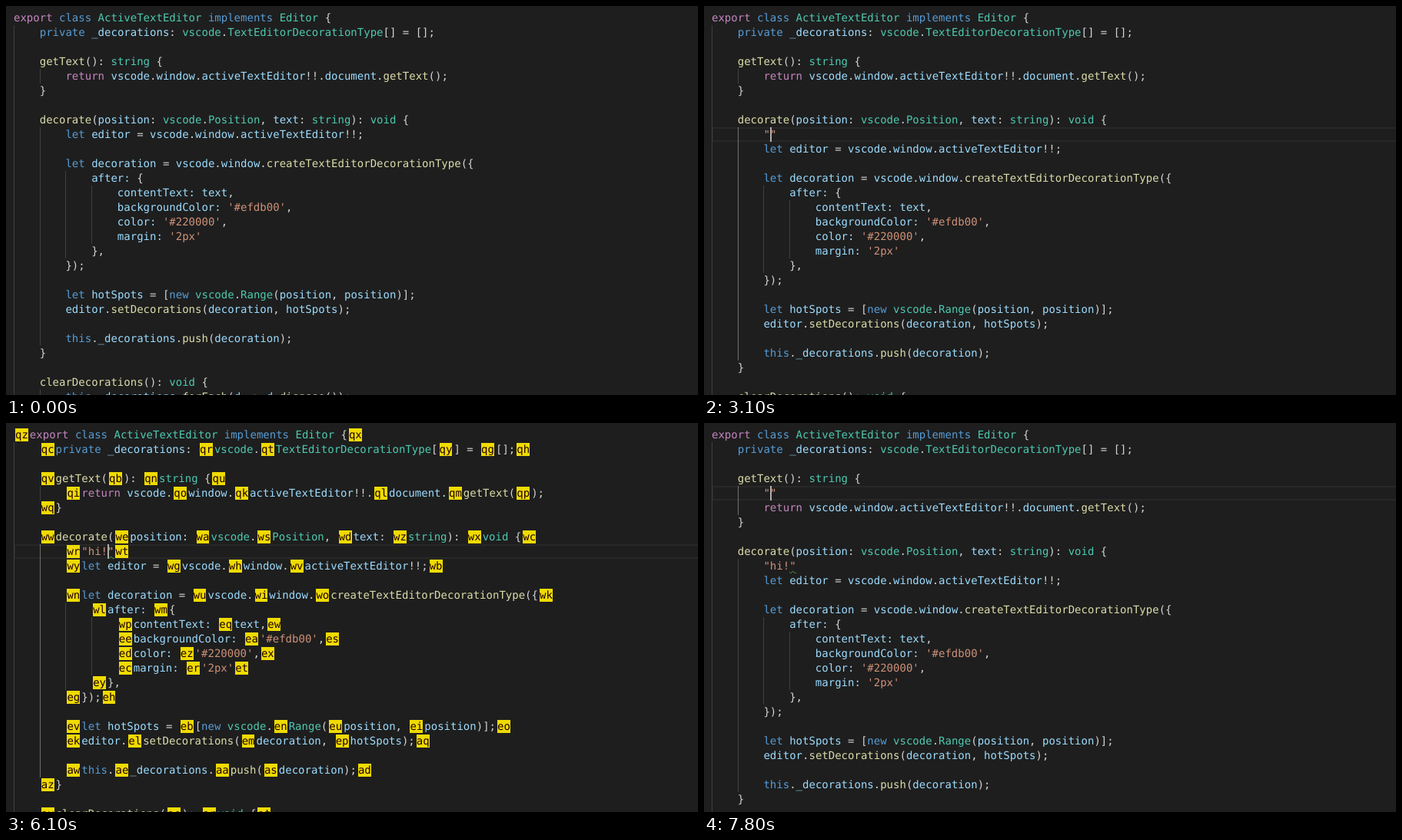
Recreate the animation shown at these times as an HTML page. Size 900 px wide and 507 px high, loop 8 s.

```html
<!DOCTYPE html>
<html lang="en">
<head>
<meta charset="utf-8">
<title>Jump hints in a code editor</title>
<style>
  html, body { margin: 0; width: 100%; height: 100%; overflow: hidden; background: #1e1e1e; }
  #editor {
    position: relative; width: 900px; height: 507px; overflow: hidden;
    font: 14px/21px "DejaVu Sans Mono", monospace; color: #d4d4d4;
    text-rendering: geometricPrecision; font-variant-ligatures: none;
  }
  .line { position: absolute; left: 10px; right: 0; height: 19px; white-space: pre; }
  .current { box-shadow: inset 2px 2px #282828, inset 0 -2px #282828; }
  .guide { position: absolute; width: 1px; height: 19px; background: #404040; }
  .guide.active { background: #707070; }
  .control { color: #c586c0; }
  .keyword { color: #569cd6; }
  .type { color: #4ec9b0; }
  .call { color: #dcdcaa; }
  .string { color: #ce9178; }
  .key, .name { color: #9cdcfe; }
  mark { margin: 0 2px; padding-top: 1px; background: #efdb00; color: #220000; }
  /* No left offset: these stay at their place in the text without moving it. */
  .caret, .bracket, .squiggle { position: absolute; top: 0; }
  .caret { width: 2px; height: 19px; background: #aeafad; }
  .bracket { box-sizing: border-box; width: 1ch; height: 19px; border: 1px solid #888; background: #0064001a; }
  .squiggle { top: 16px; width: 9px; height: 3px; fill: none; stroke: #4d9e4d; }
</style>
</head>
<body>
<div id="editor"></div>
<script>
// Markers in the text: · jump hint, ¦ caret, □ bracket frame, ~ squiggle
const CODE = `·export class ActiveTextEditor implements Editor {·
    ·private _decorations: ·vscode.·TextEditorDecorationType[·] = ·[];·

    ·getText(·): ·string {·
        ·return vscode.·window.·activeTextEditor!!.·document.·getText(·);
    ·}

    ·decorate(·position: ·vscode.·Position, ·text: ·string): ·void {·
        ·let editor = ·vscode.·window.·activeTextEditor!!;·

        ·let decoration = ·vscode.·window.·createTextEditorDecorationType({·
            ·after: ·{
                ·contentText: ·text,·
                ·backgroundColor: ·'#efdb00',·
                ·color: ·'#220000',·
                ·margin: ·'2px'·
            ·},
        ·});·

        ·let hotSpots = ·[new vscode.·Range(·position, ·position)];·
        ·editor.·setDecorations(·decoration, ·hotSpots);·

        ·this.·_decorations.·push(·decoration);·
    ·}

    ·clearDecorations(·): ·void {·
        ·this.·_decorations.·forEach(·d => ·d.dispose(·));·`.split('\n');

const LOOP = 8000, LINE = 19, TOP = 6, LEFT = 10, INDENT = 4 * 14 * 1233 / 2048;
const HINT_KEYS = 'qweasdzxcrtyghvbnuioklmp', FIRST_HINT = 6;
const TOKEN = new RegExp([
  /(?<string>"[^"]*"|'[^']*')/,
  /(?<control>\b(?:export|return)\b)/,
  /(?<keyword>\b(?:class|implements|private|let|new|this)\b|=>)/,
  /(?<type>\b(?:string|void|[A-Z]\w*)\b|(?<=: ·?|new )vscode)/,
  /(?<call>\w+(?=\())/,
  /(?<key>(?<=^ +·?)\w+:)/,
  /(?<name>\w+)/
].map(r => r.source).join('|'), 'g');

const SQUIGGLE = '<svg class="squiggle"><path d="M0 1.3 1.7 3 4.7 0 7.7 3 9 1.7"/></svg>';

// getText and decorate: first statement of that method; open: method whose brace holds the caret
const done = '"hi!~"', typed = '·"hi!¦~"·';
const TIMELINE = [
  [0, {}],
  [600, { hints: true }],
  [2000, { open: 'decorate' }],
  [2400, { open: 'decorate', blink: true }],
  [3100, { decorate: '"¦"' }],
  [3500, { decorate: '"h¦"' }],
  [3800, { decorate: '"hi¦"' }],
  [4000, { decorate: '"hi!¦"' }],
  [4200, { decorate: typed }],
  [4500, { decorate: typed, blink: true }],
  [5100, { decorate: typed, hints: true }],
  [5600, { decorate: typed, hints: true, blink: true }],
  [6100, { decorate: typed, hints: true }],
  [6400, { decorate: done, open: 'getText' }],
  [6800, { decorate: done, open: 'getText', blink: true }],
  [7100, { decorate: done, getText: '¦' }],
  [7800, { decorate: done, getText: '"¦"' }]
];

function buildLines({ open, decorate, getText }) {
  const lines = [...CODE];
  if (open) {
    const start = lines.findIndex(line => line.startsWith(`    ·${open}(`));
    const end = lines.indexOf('    ·}', start);
    lines[start] = lines[start].replace('{', '□{¦');
    lines[end] = lines[end].replace('}', '□}');
  }
  const insert = (row, text) => text && lines.splice(row, 0, '        ' + text);
  insert(8, decorate);
  insert(4, getText);
  return lines;
}

// Blank lines take the depth of the next line with text.
function depths(lines) {
  const result = [];
  for (let i = lines.length - 1; i >= 0; i--) {
    const indent = lines[i].search(/[^ ]/);
    result[i] = indent < 0 ? result[i + 1] : indent / 4;
  }
  return result;
}

function render(state) {
  const lines = buildLines(state), depth = depths(lines);
  const current = lines.findIndex(line => line.includes('¦'));
  const activeDepth = depth[current];
  let first = current, last = current;
  while (depth[first - 1] >= activeDepth) first--;
  while (depth[last + 1] >= activeDepth) last++;

  let hint = FIRST_HINT;
  const nextHint = () => {
    const n = HINT_KEYS.length, label = HINT_KEYS[Math.floor(hint / n)] + HINT_KEYS[hint % n];
    hint++;
    return `<mark>${label}</mark>`;
  };
  const markers = {
    '·': () => state.hints ? nextHint() : '',
    '¦': () => state.blink ? '' : '<i class="caret"></i>',
    '□': () => '<i class="bracket"></i>',
    '~': () => SQUIGGLE
  };
  const highlight = line => line
    .replace(TOKEN, (text, ...rest) => {
      const groups = rest.at(-1);
      const kind = Object.keys(groups).find(name => groups[name]);
      return `<span class="${kind}">${text}</span>`;
    })
    .replace(/[·¦□~]/g, marker => markers[marker]());

  document.getElementById('editor').innerHTML = lines.map((line, row) => {
    const top = TOP + row * LINE;
    let html = `<div class="line${row === current ? ' current' : ''}" style="top:${top}px">${highlight(line)}</div>`;
    for (let level = 0; level < depth[row]; level++) {
      const active = level === activeDepth - 1 && row >= first && row <= last;
      const left = Math.round(LEFT + level * INDENT);
      html += `<i class="guide${active ? ' active' : ''}" style="left:${left}px;top:${top}px"></i>`;
    }
    return html;
  }).join('');
}

let shown;
const startTime = performance.now();
function tick() {
  const time = (performance.now() - startTime) % LOOP;
  const state = TIMELINE.findLast(([from]) => from <= time)[1];
  if (state !== shown) render(shown = state);
  requestAnimationFrame(tick);
}
tick();
</script>
</body>
</html>
```
